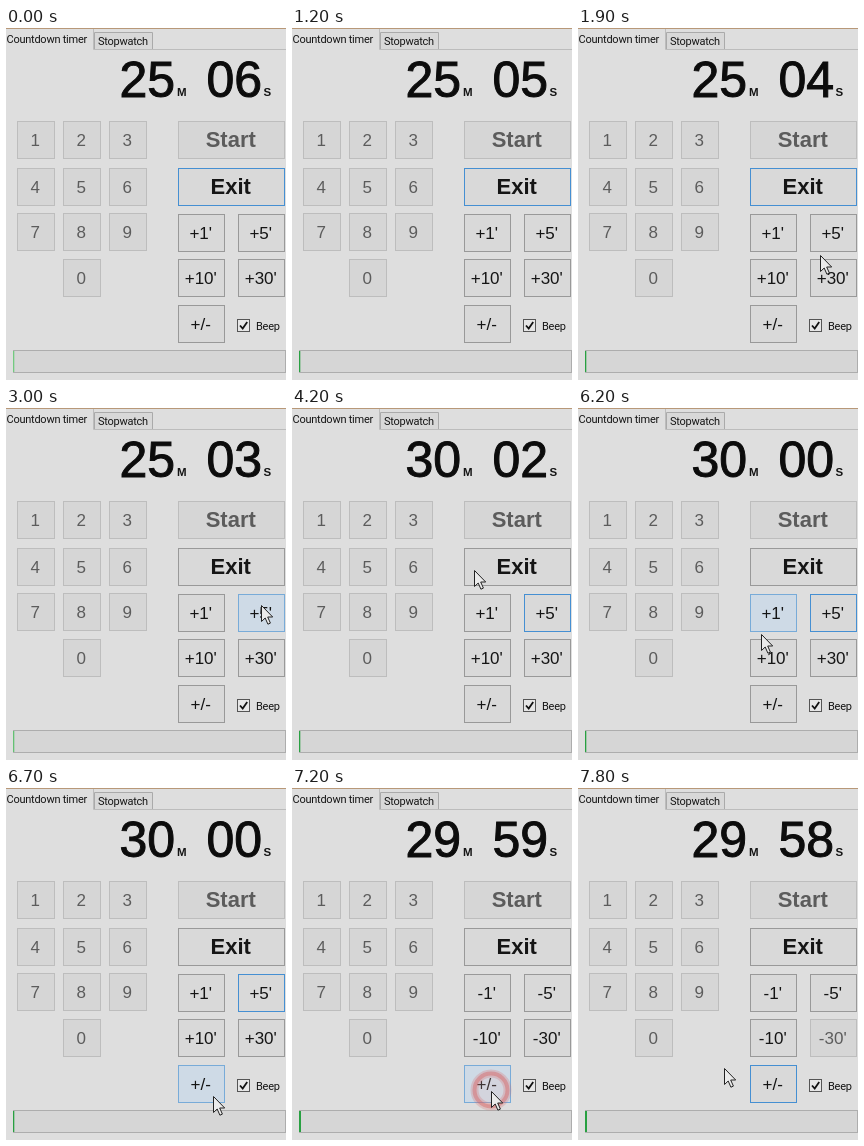
Recreate the animation shown at these times as an HTML page. Size 280 by 352 pixels, loop 8000 ms.

```html
<!DOCTYPE html>
<html lang="en">
<head>
<meta charset="utf-8">
<title>Countdown timer</title>
<style>
  html, body { margin: 0; width: 100%; height: 100%; overflow: hidden; background: #dedede; }
  svg { display: block; width: 280px; height: 352px; }
  text { font-family: "Liberation Sans", Arial, sans-serif; fill: #151515; }
  .label { font: 11px Roboto, sans-serif; letter-spacing: -.25px; }
  .time { font-size: 50px; fill: #0c0c0c; stroke: #0c0c0c; stroke-width: 1; }
  .unit { font-size: 11.5px; font-weight: bold; }
  .button text { font-size: 17px; text-anchor: middle; }
  .button.big text { font-size: 22px; font-weight: bold; }
  .button rect { fill: #d9d9d9; stroke: #999; }
  .button.focus rect { stroke: #458fd2; }
  .button.hot rect { fill: #cedae6; stroke: #78abd8; }
  .button.off rect { fill: #d6d6d6; stroke: #bdbdbd; }
  .button.off text { fill: #5c5c5c; }
</style>
</head>
<body>
<svg id="stage" viewBox="0 0 280 352">
  <rect width="280" height="352" fill="#dedede"/>
  <path d="M0 .5H280" stroke="#b89878"/>
  <path d="M88.5 21V4.5H146.5V21" fill="#d8d8d8" stroke="#aaa"/>
  <path d="M87.5 1V21.5H280" fill="none" stroke="#bcbcbc"/>
  <text class="label" x=".5" y="15">Countdown timer</text>
  <text class="label" x="92" y="17">Stopwatch</text>
  <text class="time" id="minutes" x="113.500" y="68.5"></text>
  <text class="unit" x="171" y="68">M</text>
  <text class="time" id="seconds" x="200.500" y="68.5"></text>
  <text class="unit" x="257.500" y="68">S</text>
  <g id="buttons"></g>
  <rect x="231.5" y="291.5" width="12" height="12" fill="#e6e6e6" stroke="#555"/>
  <path d="M234 297.5l2.7 3 4.5-6.500" fill="none" stroke="#111" stroke-width="1.8"/>
  <text class="label" x="250" y="302">Beep</text>
  <rect x="7.5" y="322.5" width="272" height="22" fill="#d6d6d6" stroke="#adadad"/>
  <rect id="fill" x="7" y="323" height="21"/>
  <g id="ring" fill="none" stroke="#d86060">
    <circle r="16.500" fill="#e8b8b8" fill-opacity=".25" stroke-width="8" stroke-opacity=".3"/>
    <circle r="16.500" stroke-width="4" stroke-opacity=".6"/>
  </g>
  <path id="cursor" d="M-.5 .5V16.500L3.200 13L5.900 19.200L8.400 18.100L5.700 12H10.700Z" fill="#ebebeb" stroke="#222"/>
</svg>
<script>
const LOOP = 8000, STEP = 100;
const TICKS = [1000, 1900, 2900, 3900, 5000, 6000, 6900, 7700];
const CLICKS = [{ at: 2600, x: 256, y: 197 }, { at: 6900, x: 199, y: 302 }];
const RING_TIME = 400;
// time, x, y
const PATH = [
  [1800, 270, 262], [1900, 243, 227], [2200, 256, 197], [3800, 256, 197],
  [4200, 183, 162], [4600, 146, 143], [5500, 146, 143], [5600, 147, 143],
  [5800, 147, 143], [6200, 184, 226], [6600, 192, 288], [6700, 208, 308],
  [6900, 200, 303], [7300, 200, 303], [7700, 147, 280]
];
const ROWS = [93, 140, 185, 231];
const $ = id => document.getElementById(id);
const between = (t, a, b) => t >= a && t < b;

function svg(parent, tag, attributes) {
  const node = document.createElementNS("http://www.w3.org/2000/svg", tag);
  for (const key in attributes) node.setAttribute(key, attributes[key]);
  return parent.appendChild(node);
}

function button(label, x, y, width, height, type = "") {
  const group = svg($("buttons"), "g", { class: "button " + type });
  svg(group, "rect", { x: x + .5, y: y + .5, width, height });
  const baseline = y + height / 2 + (type.includes("big") ? 7.5 : 6.5);
  const text = svg(group, "text", { x: x + width / 2 - .25, y: baseline });
  text.textContent = label;
  return { group, text };
}

for (let n = 1; n <= 9; n++) {
  button(n, 11 + (n - 1) % 3 * 46, ROWS[Math.floor((n - 1) / 3)], 37, 37, "off");
}
button(0, 57, ROWS[3], 37, 37, "off");
button("Start", 172, ROWS[0], 106, 37, "big off");
const exit = button("Exit", 172, ROWS[1], 106, 37, "big");
const steps = [1, 5, 10, 30].map((amount, i) =>
  ({ amount, ...button("", 172 + i % 2 * 60, 186 + (i >> 1) * 45, 46, 37) }));
const [one, five, ten, thirty] = steps;
const sign = button("+/-", 172, 277, 46, 37);

function cursorAt(t) {
  if (t < PATH[0][0]) return null;
  const next = PATH.findIndex(point => point[0] > t);
  if (next < 0) return PATH.at(-1).slice(1);
  const [t0, x0, y0] = PATH[next - 1], [t1, x1, y1] = PATH[next];
  const k = (t - t0) / (t1 - t0);
  return [x0 + (x1 - x0) * k, y0 + (y1 - y0) * k];
}

function setState(item, state, on) {
  item.group.classList.toggle(state, on);
}

function render(t) {
  const ticks = TICKS.filter(at => at <= t).length;
  // The added five minutes show up on the tick after the click.
  const left = 25 * 60 + 6 - ticks + (t >= TICKS[3] ? 300 : 0);
  $("minutes").textContent = Math.floor(left / 60);
  $("seconds").textContent = String(left % 60).padStart(2, "0");

  const prefix = t < CLICKS[1].at ? "+" : "-";
  for (const { amount, text } of steps) text.textContent = `${prefix}${amount}'`;
  setState(exit, "focus", t < 2600);
  setState(five, "focus", between(t, 2600, 6900));
  setState(sign, "focus", t >= 6900);
  setState(five, "hot", between(t, 2200, 3900));
  setState(one, "hot", between(t, 6100, 6300));
  setState(ten, "hot", between(t, 6300, 6500));
  setState(sign, "hot", between(t, 6600, 7500));
  setState(thirty, "off", t >= 7700);

  // A highlight sweeps over the bar about every three seconds.
  const phase = (t + 50) % 2950;
  const glow = Math.max(0, 1 - Math.min(phase, 2950 - phase) / 300);
  $("fill").setAttribute("width", t < 6900 ? 1.3 : 2);
  $("fill").setAttribute("fill", `rgb(${40 + 90 * glow},${160 + 50 * glow},${65 + 75 * glow})`);

  const click = CLICKS.find(c => between(t, c.at, c.at + RING_TIME));
  $("ring").setAttribute("opacity", click ? 1 - .3 * (t - click.at) / RING_TIME : 0);
  if (click) $("ring").setAttribute("transform", `translate(${click.x} ${click.y})`);

  const position = cursorAt(t);
  $("cursor").setAttribute("visibility", position ? "visible" : "hidden");
  if (position) $("cursor").setAttribute("transform", `translate(${position.map(Math.round).join(" ")})`);
}

const start = performance.now();
function frame() {
  const t = (performance.now() - start) % LOOP;
  render(Math.floor(t / STEP) * STEP);
  requestAnimationFrame(frame);
}
frame();
</script>
</body>
</html>
```
